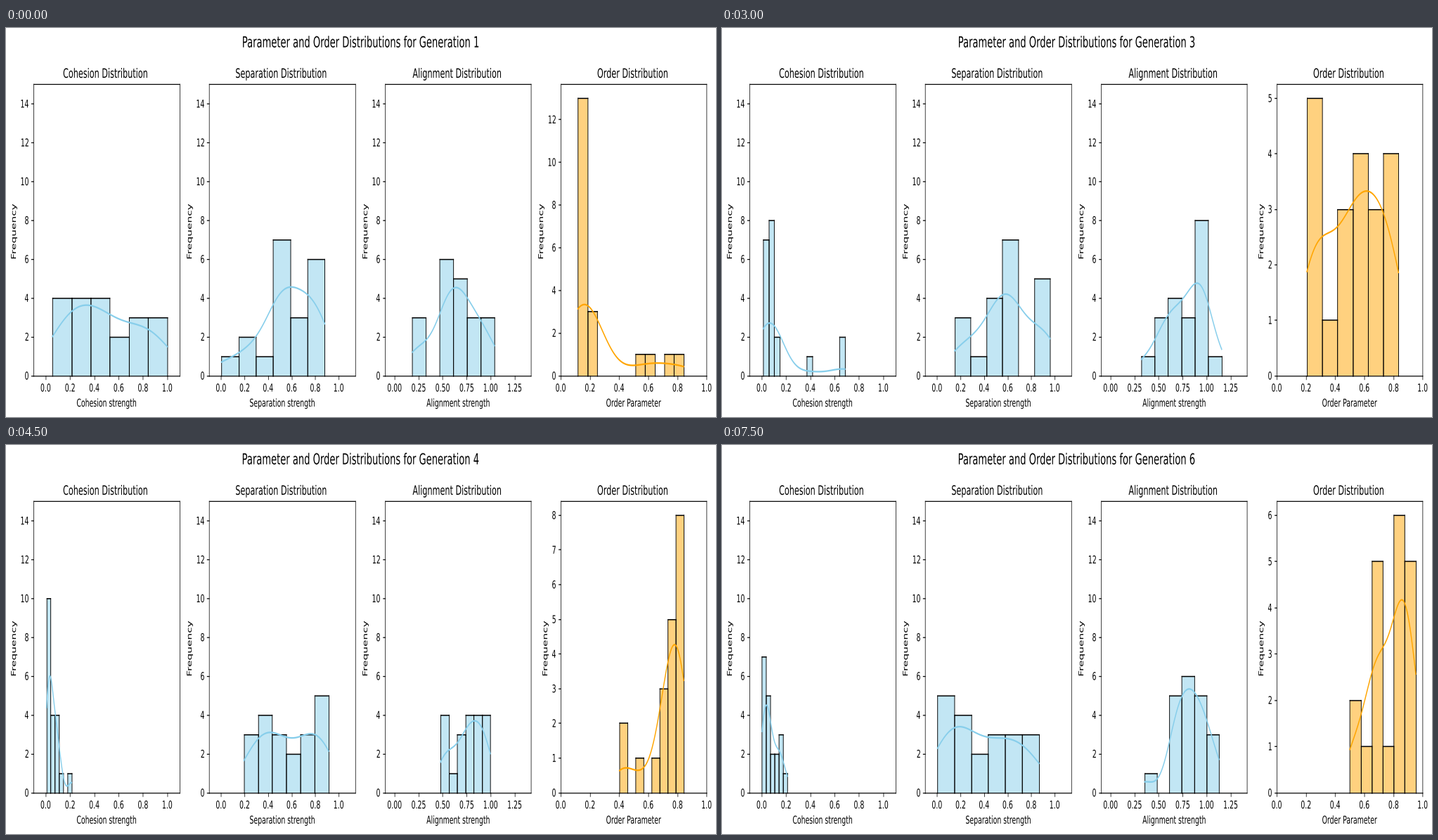
A matplotlib script for the animation above (8 s loop, 1010x554 px).

```python
import matplotlib.pyplot as plt
import numpy as np
from matplotlib.animation import FuncAnimation
from matplotlib.patches import PathPatch, Polygon
from matplotlib.textpath import TextPath
from matplotlib.transforms import Affine2D

plt.rcParams["font.family"] = "DejaVu Sans"
plt.rcParams["path.snap"] = False

W, H = 1010, 554
# A 15 x 5 inch chart of 1500 x 500 dots is squeezed onto the stage.
KX, KY = W / 1080, H / 360          # pixels per point
DOT_X, DOT_Y = W / 1500, H / 500    # pixels per chart dot
LEFT, PITCH, AX_W = 39.06, 250, 207.8
TOP, BOTTOM = 79.85, 494.85
GENERATIONS = 6

# Each generation: lowest value, highest value, count per bin.
COHESION = [
    (.056, .999, [4, 4, 4, 2, 3, 3]),
    (.024, .881, [6, 2, 4, 3, 1, 4]),
    (.013, .685, [7, 8, 2] + [0] * 5 + [1] + [0] * 5 + [2]),
    (.007, .213, [10, 4, 4, 1, 0, 1]),
    (.013, .178, [3, 5, 7, 3, 0, 1, 0, 1]),
    (.003, .212, [7, 5, 2, 2, 3, 1]),
]
SEPARATION = [
    (.004, .881, [1, 2, 1, 7, 3, 6]),
    (.004, .899, [1, 0, 3, 6, 6, 4]),
    (.150, .961, [3, 1, 4, 7, 0, 5]),
    (.195, .914, [3, 4, 3, 2, 3, 5]),
    (.088, .931, [5] + [3] * 5),
    (.004, .866, [5, 4, 2, 3, 3, 3]),
]
ALIGNMENT = [
    (.185, 1.04, [3, 0, 6, 5, 3, 3]),
    (.018, 1.12, [1, 3, 6, 3, 4, 3]),
    (.320, 1.156, [1, 3, 4, 3, 8, 1]),
    (.478, .997, [4, 1, 3, 4, 4, 4]),
    (.452, 1.022, [1, 2, 3, 4, 5, 5]),
    (.354, 1.128, [1, 0, 5, 6, 5, 3]),
]
ORDER = [
    (.118, .842, [13, 3] + [0] * 4 + [1, 1, 0, 1, 1]),
    (.121, .817, [12, 3, 1, 0, 0, 1, 0, 0, 0, 1, 0, 0, 1, 0, 1]),
    (.207, .834, [5, 1, 3, 4, 3, 4]),
    (.402, .842, [2, 0, 1, 0, 1, 3, 5, 8]),
    (.443, .947, [2, 2, 4, 5, 3, 4]),
    (.501, .952, [2, 1, 5, 1, 6, 5]),
]

# Name, axis label, x limits, last tick, tick step, tick format, colour, data
PANELS = [
    ("Cohesion", "Cohesion strength", (-.1, 1.1), 1, .2, ".1f",
     "skyblue", COHESION),
    ("Separation", "Separation strength", (-.1, 1.14), 1, .2, ".1f",
     "skyblue", SEPARATION),
    ("Alignment", "Alignment strength", (-.1, 1.42), 1.25, .25, ".2f",
     "skyblue", ALIGNMENT),
    ("Order", "Order Parameter", (0, 1), 1, .2, ".1f", "orange", ORDER),
]

fig = plt.figure(figsize=(W / 100, H / 100), dpi=100, facecolor="white")
stage = fig.add_axes([0, 0, 1, 1])
stage.set_xlim(0, W)
stage.set_ylim(H, 0)
stage.axis("off")


def snap(v, dot):
    """Move straight edges to the centre of a chart dot."""
    return (np.floor(v / dot + .5) + .5) * dot


def to_x(left, limits, v):
    return left + (v - limits[0]) / (limits[1] - limits[0]) * AX_W


def to_y(v, top):
    return BOTTOM - v / top * (BOTTOM - TOP)


def text(s, x, y, size, align=.5, angle=0):
    """Place text on baseline y; align is the fraction of its width left of x."""
    path = TextPath((0, 0), s, size=size)
    box = path.get_extents()
    anchor = box.x0 + align * box.width
    squeeze = (Affine2D().translate(-anchor, 0).rotate_deg(angle)
               .scale(KX, -KY).translate(x, y))
    return stage.add_patch(PathPatch(squeeze.transform_path(path),
                                     fc="black", lw=0, zorder=4))


def stroke(xs, ys, width, color="black", zorder=3):
    """Line whose width in points is squeezed together with the chart."""
    pts = np.column_stack([np.array(xs) / KX, np.array(ys) / KY])
    tangent = np.gradient(pts, axis=0)
    tangent /= np.hypot(*tangent.T)[:, None]
    half = width / 2
    pts[0] -= half * tangent[0]
    pts[-1] += half * tangent[-1]
    side = half * np.column_stack([-tangent[:, 1], tangent[:, 0]])
    outline = np.vstack([pts + side, (pts - side)[::-1]]) * (KX, KY)
    return stage.add_patch(Polygon(outline, fc=color, lw=0, zorder=zorder))


def spread(lo, hi, counts):
    """Values spaced evenly inside their bins, reaching both ends."""
    edges = np.linspace(lo, hi, len(counts) + 1)
    width = edges[1] - edges[0]
    values = np.concatenate([e + width * (np.arange(n) + .5) / n
                             for e, n in zip(edges, counts) if n])
    values[0], values[-1] = lo, hi
    return edges, values


def density(values, grid, bin_width):
    """Gaussian kernel density with Scott's rule, scaled to bin counts."""
    band = values.std(ddof=1) * len(values) ** -.2
    z = (grid[:, None] - values) / band
    return np.exp(-z * z / 2).sum(axis=1) * bin_width / (band * np.sqrt(2 * np.pi))


def y_axis(left, ticks, top):
    parts = []
    edge = snap(left, DOT_X)
    for v in ticks:
        y = to_y(v, top)
        row = snap(y, DOT_Y)
        parts.append(stroke([edge - 3, edge], [row, row], .8))
        parts.append(text(str(v), left - 7.2, y + 5.8, 10, align=1))
    offset = 25 if ticks[-1] >= 10 else 19
    parts.append(text("Frequency", left - offset, 289.5, 10, angle=90))
    return parts


def histogram(left, limits, top, color, lo, hi, counts):
    edges, values = spread(lo, hi, counts)
    grid = np.linspace(lo, hi, 200)
    curve = density(values, grid, edges[1] - edges[0])
    parts = [stroke(to_x(left, limits, grid), to_y(curve, top), 1.5, color, 2)]

    cols = snap(to_x(left, limits, edges), DOT_X)
    base = snap(BOTTOM, DOT_Y)
    for x0, x1, n in zip(cols, cols[1:], counts):
        if n:
            y = snap(to_y(n, top), DOT_Y)
            xs, ys = [x0, x0, x1, x1], [base, y, y, base]
            parts.append(stage.add_patch(Polygon(
                np.column_stack([xs, ys]), fc=color, alpha=.5, lw=0, zorder=1)))
            for k in range(3):
                parts.append(stroke(xs[k:k + 2], ys[k:k + 2], 1, zorder=1.5))
    return parts


def draw_panel(left, name, label, limits, last, step, fmt):
    x0, x1 = snap(left, DOT_X), snap(left + AX_W, DOT_X)
    y0, y1 = snap(TOP, DOT_Y), snap(BOTTOM, DOT_Y)
    for x in (x0, x1):
        stroke([x, x], [y0, y1], .8)
    for y in (y0, y1):
        stroke([x0, x1], [y, y], .8)
    for v in np.arange(0, last + step / 2, step):
        x = to_x(left, limits, v)
        col = snap(x, DOT_X)
        stroke([col, col], [y1, y1 + 4.8], .8)
        text(format(v, fmt), x, 517.7, 10)
    middle = left + AX_W / 2
    text(name + " Distribution", middle - 1.7, 70.9, 12)
    text(label, middle, 539.2, 10)
    if name != "Order":
        y_axis(left, range(0, 15, 2), 15)


for i, panel in enumerate(PANELS):
    draw_panel(LEFT + i * PITCH, *panel[:6])

FRAMES = 16
FRAMES_PER_GENERATION = 3
live = []


def update(frame):
    while live:
        live.pop().remove()
    gen = min(frame // FRAMES_PER_GENERATION, GENERATIONS - 1)
    live.append(text("Parameter and Order Distributions for Generation "
                     f"{gen + 1}", 504.6, 27.5, 14))
    for i, (name, _, limits, *_, color, rows) in enumerate(PANELS):
        left = LEFT + i * PITCH
        top = 15
        if name == "Order":
            peak = max(rows[gen][2])
            top = peak * 1.05
            step = 2 if peak >= 10 else 1
            live.extend(y_axis(left, range(0, peak + 1, step), top))
        live.extend(histogram(left, limits, top, color, *rows[gen]))
    return live


anim = FuncAnimation(fig, update, frames=FRAMES, interval=500,
                     init_func=lambda: update(0), repeat=True,
                     repeat_delay=0, blit=False)
plt.show()
```
